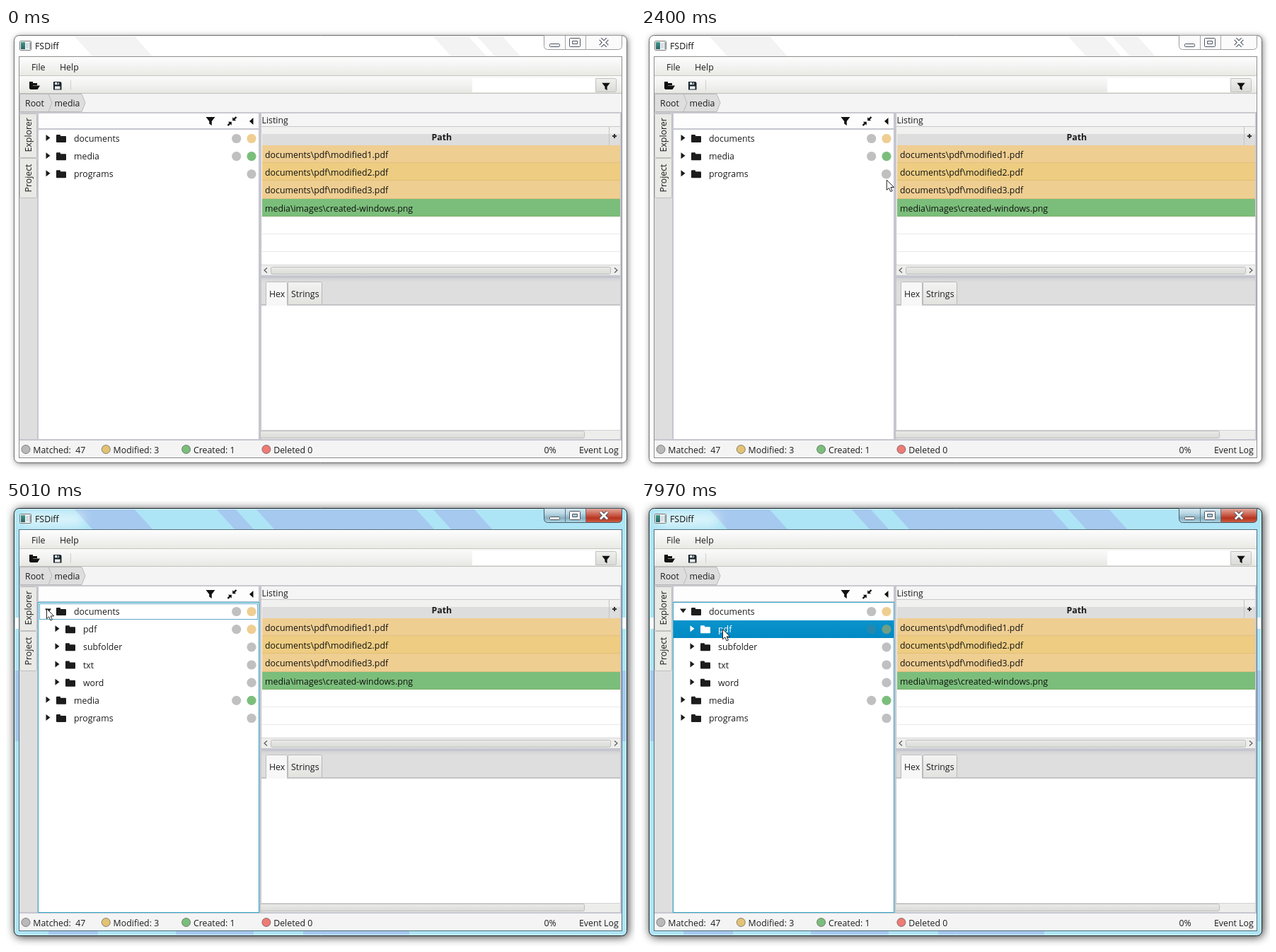
Write an HTML page with a canvas that moves like this. It is 889x630 px and loops after 8000 ms.

```html
<!DOCTYPE html>
<html lang="en">
<head>
<meta charset="utf-8">
<title>FSDiff</title>
<style>
html, body { margin: 0; width: 100%; height: 100%; overflow: hidden; background: #fff; }
canvas { display: block; width: 889px; height: 630px; }
</style>
</head>
<body>
<canvas id="stage" width="889" height="630"></canvas>
<script>
const c = document.getElementById('stage').getContext('2d');
const LOOP = 8000, OPEN_AT = 5010, SELECT_AT = 7960, HOVER_MS = 175, ROW = 25.17;
const GRAY = '#c0c0c0', AMBER = '#efce92', GREEN = '#7bbe7b', INK = '#1c1c1c', RULE = '#c5c6cf';

// pointer strokes: start, end, x, y, downward bow, ease-out power
const ENTRY = { x: 275, y: 624 };
const MOVES = [
  [830, 1560, 307, 338, 0, 2.6],
  [1820, 2520, 347, 214],
  [2720, 3140, 348, 186],
  [3340, 3760, 347, 163],
  [4090, 4750, 57, 152, 37, 3.7],
  [5340, 6120, 338, 186, 38],
  [6180, 6450, 357, 183],
  [6450, 6760, 345, 184],
  [7020, 7410, 135, 193],
  [7670, 7940, 115, 181]
];

const TOP = [
  { name: 'documents', depth: 0, col: AMBER, count: '3' },
  { name: 'media', depth: 0, col: GREEN, count: '1' },
  { name: 'programs', depth: 0, col: GRAY, count: '5' }
];
const INNER = ['pdf', 'subfolder', 'txt', 'word'].map((name, i) =>
  ({ name, depth: 1, col: i ? GRAY : AMBER, count: '3' }));

const clamp = v => Math.max(0, Math.min(1, v));
const rowsAt = t => t < OPEN_AT ? TOP : [TOP[0], ...INNER, TOP[1], TOP[2]];

function box(x, y, w, h, fill) { c.fillStyle = fill; c.fillRect(x, y, w, h); }

function frameBox(x, y, w, h, col) {
  c.lineWidth = 1;
  c.strokeStyle = col;
  c.strokeRect(x, y, w, h);
}

function fade(y0, y1, ...cols) {
  const g = c.createLinearGradient(0, y0, 0, y1);
  cols.forEach((col, i) => g.addColorStop(i / (cols.length - 1), col));
  return g;
}

function round(x, y, w, h, r, fill, stroke) {
  c.beginPath();
  c.roundRect(x, y, w, h, r);
  if (fill) { c.fillStyle = fill; c.fill(); }
  if (stroke) { c.strokeStyle = stroke; c.lineWidth = 1; c.stroke(); }
}

function poly(pts, fill, stroke, width = 1) {
  c.beginPath();
  for (let i = 0; i < pts.length; i += 2) c.lineTo(pts[i], pts[i + 1]);
  if (fill) { c.closePath(); c.fillStyle = fill; c.fill(); }
  if (stroke) { c.strokeStyle = stroke; c.lineWidth = width; c.stroke(); }
}

function text(s, x, y, fill = INK, weight = '') {
  c.font = `${weight} 12.35px "Open Sans", "Noto Sans", sans-serif`;
  c.fillStyle = fill;
  c.fillText(s, x, y);
}

function at(x, y, draw, turn = 0) {
  c.save();
  c.translate(x, y);
  c.rotate(turn);
  draw();
  c.restore();
}

function tip(t) {
  let p = ENTRY;
  for (const [t0, t1, x, y, bow = 0, power = 3] of MOVES) {
    if (t < t0) break;
    const s = 1 - (1 - clamp((t - t0) / (t1 - t0))) ** power;
    p = {
      x: p.x + (x - p.x) * s,
      y: p.y + (y - p.y) * s + bow * Math.sin(Math.PI * s)
    };
  }
  return p;
}

// share of the last moments the pointer spent on the badge in row i
function hover(t, name) {
  let hits = 0;
  const steps = 25;
  for (let k = 0; k < steps; k++) {
    const past = t - k * HOVER_MS / steps, p = tip(past);
    const i = rowsAt(past).findIndex(r => r.name === name);
    if (i >= 0 && p.x > 339.5 && p.x < 360 && Math.abs(p.y - 156.5 - i * ROW) < 8) hits++;
  }
  return hits / steps;
}

// leaning stripes across the glass of the title bar
function stripes(col, spans) {
  for (const [l, r] of spans) poly([l, 10, r, 10, r + 28, 41, l + 28, 41], col);
}

function chrome(active) {
  c.save();
  c.shadowColor = active ? 'rgba(0,0,0,.85)' : 'rgba(0,0,0,.5)';
  c.shadowBlur = active ? 13 : 8;
  c.shadowOffsetX = c.shadowOffsetY = 1.5;
  round(11.5, 10.5, 866, 605, 7, active ? '#aee5f6' : '#fff');
  c.restore();

  c.save();
  round(11.5, 10.5, 866, 605, 7);
  c.clip();
  if (active) {
    const blue = '#a6c9ef';
    stripes(blue, [[95, 180], [296, 323], [352, 578], [602, 660]]);
    for (const x of [12, 871]) {
      box(x, 165, 7, 16, '#fff');
      box(x, 240, 7, 100, blue);
    }
    for (let i = 0; i < 3; i++) box(60 + i * 180, 608, 70 + i * 40, 8, blue);
    c.filter = 'blur(8px)';
    round(22, 18, 88, 16, 8, 'rgba(255,255,255,.7)');
  } else stripes('#f3f3f3', [[95, 180], [602, 652], [664, 700]]);
  c.restore();
  round(12.5, 11.5, 864, 603, 6, null, active ? '#d9f5fc' : '#fafafa');
  round(11.5, 10.5, 866, 605, 7, null, active ? '#17242c' : '#707070');

  // caption buttons
  const low = [0, 0, 5, 5], sign = '#4c5560';
  round(760.5, 10.5, 110, 20, low, active ? fade(11, 31, '#d5eaf3', '#bad7e4', '#88afc0', '#b5dce9') : '#fbfbfb');
  if (active) round(819.5, 10.5, 51, 20, [0, 0, 5, 0], fade(11, 31, '#e3a79b', '#d06e5c', '#b8331f', '#d0684a'));
  round(760.5, 10.5, 110, 20, low, null, active ? '#445b66' : '#9b9b9b');
  for (const x of [790, 819]) box(x, 11, 1, 20, active ? '#5b7583' : '#a6a6a6');
  round(768.5, 22.5, 14, 4, 1, '#fff', sign);
  round(796.5, 14.5, 15, 12, 1, '#fff', sign);
  round(800.5, 18.5, 7, 4, 0, active ? '#a9c9d8' : '#fff', sign);
  for (const [col, w] of [[sign, 5], ['#fff', 2.8]])
    for (const s of [5, -5]) poly([845 - s, 15.5, 845 + s, 25.5], null, col, w);

  // window symbol and title
  round(19.5, 18.5, 16, 13, 1, '#f7f7f7', '#777');
  box(21, 20, 6, 10, fade(20, 30, '#3f9a8a', '#2c5f66'));
  box(28, 21, 4, 8, '#d5dbe0');
  box(33, 20, 2, 10, '#a8b4ba');
  text('FSDiff', 41, 30, '#111');

  box(18, 40, 853, 569, active ? '#55707c' : '#8d8d8d');
  box(19, 41, 851, 567, '#f4f4f4');
}

function funnel(x, y, s = 1) {
  at(x, y, () => {
    c.scale(s, s);
    poly([-6.5, -6, 6.5, -6, 1.8, 0, 1.8, 6, -1.8, 3.5, -1.8, 0], '#111');
  });
}

function crumb(x, end, s, sx) {
  poly([x, 93.5, end - 5, 93.5, end, 106, end - 5, 118.5, x, 118.5], '#dedede', '#b9b9b9');
  text(s, sx, 111);
}

function bars() {
  box(19, 41, 851, 27, fade(41, 68, '#fdfdfd', '#f3f3f2', '#e9e9e3'));
  box(19, 67, 851, 1, '#c6c6c2');
  text('File', 36, 60);
  text('Help', 76, 60);

  box(19, 68, 851, 25, fade(68, 93, '#fafafa', '#f2f2f1', '#e6e6e1'));
  box(19, 92, 851, 1, '#c0c0bd');
  box(33, 76, 5, 10, '#111');
  box(33, 78, 11, 3, '#111');
  poly([37, 81.5, 48, 81.5, 44.5, 87, 33.7, 87], '#111');
  round(67, 76, 11.5, 11.5, [0, 2.5, 0, 0], '#17242c');
  box(69, 77, 6, 3.2, '#f2f2f2');
  box(72.5, 77, 1.5, 2.6, '#17242c');
  box(69, 82.5, 7.5, 4, '#f2f2f2');
  box(91, 74, 1, 14, '#cfcfcb');
  box(659, 71, 175, 20, '#fff');
  round(833.5, 71.5, 29, 19, [0, 2, 2, 0], fade(71, 91, '#f1f1ef', '#d9d9d6'), '#c1c1bd');
  funnel(848, 83, .88);

  box(19, 93, 851, 27, '#f4f4f4');
  crumb(55, 112, 'media', 68.5);
  crumb(19.5, 65, 'Root', 27);
  box(19, 119, 851, 2, '#c9c9d0');
}

function sideTab(y, h, s, base) {
  round(19.5, y + .5, 24, h, 2, '#e9e9e6', '#bfbfbf');
  at(36, base, () => text(s, 0, 0), -Math.PI / 2);
}

function side() {
  box(19, 121, 26, 462, '#dedede');
  sideTab(121, 62, 'Explorer', 175.5);
  sideTab(184, 56, 'Project', 232.5);
  box(44, 120, 2, 464, RULE);
}

function thumb(x, y, w) {
  round(x, y, w, 10, 2, fade(y, y + 10, '#eaeae8', '#dadad7'), '#bdbdbd');
}

function listing() {
  box(357, 120, 4, 464, RULE);
  box(361, 121, 508, 19, '#f5f5f5');
  text('Listing', 361.5, 135);
  box(361, 139, 508, 1, '#c8c8c8');
  box(362, 140, 506, 10, '#f1f1f0');
  box(362, 150, 506, 16, '#dddddd');
  box(852, 140, 1, 26, '#c4c4c4');
  text('Path', 601.5, 158.5, INK, 'bold');
  box(857, 152, 6, 2, '#333');
  box(859, 150, 2, 6, '#333');
  box(362, 166, 506, 170, '#fff');
  const paths = [1, 2, 3].map(n => `documents\\pdf\\modified${n}.pdf`);
  paths.push('media\\images\\created-windows.png');
  for (let i = 0; i < 6; i++) {
    const y = Math.round(166 + i * ROW), end = Math.round(166 + (i + 1) * ROW);
    if (paths[i]) {
      box(362, y, 506, end - y, i === 3 ? GREEN : i === 1 ? '#eecd82' : AMBER);
      text(paths[i], 366, y + 18, '#111');
    }
    box(362, end - 1, 506, 1, paths[i] ? 'rgba(150,120,40,.16)' : '#e9e9e9');
  }
  box(361, 335, 508, 15, '#eeeeed');
  box(361, 335, 508, 1, '#d6d6d6');
  thumb(374.5, 338.5, 480);
  for (const [x, d] of [[367, 2], [862, -2]]) poly([x + d, 339.5, x - d, 343, x + d, 346.5], null, '#555', 1.1);

  // detail tabs
  box(357, 350, 512, 4, RULE);
  box(361, 354, 508, 38, fade(354, 360, '#d3d3d6', '#dedede'));
  round(367.5, 359.5, 30, 33, [2, 2, 0, 0], '#f7f7f7', '#bdbdbd');
  round(398.5, 359.5, 48, 32, [2, 2, 0, 0], fade(359, 391, '#f3f3f2', '#e2e2df'), '#b7b7b7');
  text('Hex', 372, 381);
  text('Strings', 403, 381);
  box(361, 391, 508, 2, '#c4c4c8');
  box(368, 391, 29, 2, '#f7f7f7');
  box(361, 393, 508, 176, '#fff');
  box(361, 569, 508, 13, '#ededec');
  box(361, 569, 508, 1, '#d3d3d3');
  thumb(359.5, 570.5, 458);
  box(868, 120, 2, 464, RULE);
}

function status() {
  box(19, 582, 851, 2, RULE);
  box(19, 584, 851, 24, '#f4f4f4');
  const labels = ['Matched:  47', 'Modified: 3', 'Created: 1', 'Deleted 0'];
  const cols = ['#b9b9b9', '#e3c273', GREEN, '#ef7a76'];
  labels.forEach((s, i) => {
    const x = 28 + i * 113.3;
    round(x - 6, 590.5, 12, 12, 6, cols[i], 'rgba(70,70,70,.6)');
    text(s, x + 10.3, 601.5);
  });
  text('0%', 760.5, 601.5);
  text('Event Log', 810, 601.5);
}

function folder(x, y, col) {
  round(x, y - 5.5, 6, 6, 1, col);
  round(x, y - 3.5, 14, 9, 1, col);
}

function badges(t, row, y, chosen) {
  const k = hover(t, row.name), grow = 8 * k;
  if (row.col !== GRAY) round(319.1 - grow, y - 6.6, 13.2, 13.2, 6.6, chosen ? '#2788ae' : GRAY);
  round(340.4 - grow * .88, y - 6.6, 13.2 + grow * .88, 13.2, 6.6, chosen ? '#6d9f86' : row.col);
  c.globalAlpha = clamp(k * 5 - 4);
  text(row.count, 341, y + 4.5);
  c.globalAlpha = 1;
}

function treeTools() {
  box(46, 121, 311, 22, '#fdfdfd');
  funnel(289, 132);
  for (const turn of [0, Math.PI]) at(319.5, 132, () => {
    poly([1.8, -1.8, 6, -6], null, '#111', 2.4);
    poly([.7, -.7, .7, -5.7, 5.7, -.7], '#111');
  }, turn);
  poly([344, 132, 349.5, 127, 349.5, 137], '#111');
}

function tree(t) {
  const open = t >= OPEN_AT, picked = t >= SELECT_AT;
  treeTools();
  box(45, 142, 313, 2, RULE);
  box(46, 144, 311, 438, '#fff');
  if (open) {
    frameBox(45.5, 143.5, 312, 439, '#31a9c9');
    if (picked) box(46, 169, 311, 25, fade(169, 194, '#0a93cb', '#0089c4'));
    else frameBox(47.5, 145.5, 308, 22, '#5fa9cb');
  }
  rowsAt(t).forEach((row, i) => {
    const y = 156.5 + i * ROW, x = row.depth * 13;
    const chosen = picked && row.name === 'pdf', ink = chosen ? '#fff' : INK;
    at(59.5 + x, y - 1, () => poly([-3, -4.5, 3, 0, -3, 4.5], ink), open && i === 0 ? Math.PI / 2 : 0);
    folder(71 + x, y, ink);
    text(row.name, 96 + x, Math.round(y + 4.5), ink);
    badges(t, row, y, chosen);
  });
}

function pointer(t) {
  if (t < MOVES[0][0]) return;
  const p = tip(t);
  at(p.x, p.y, () => {
    c.lineJoin = 'round';
    poly([.5, .5, .5, 14.8, 3.7, 11.8, 6, 17, 8.4, 16, 6.2, 10.9, 10.7, 10.9, .5, .5], '#fff', '#222');
  });
}

function draw(t) {
  box(0, 0, 889, 630, '#fff');
  chrome(t >= OPEN_AT);
  bars();
  side();
  listing();
  status();
  tree(t);
  pointer(t);
}

const start = performance.now();
function tick() {
  draw((performance.now() - start) % LOOP);
  requestAnimationFrame(tick);
}
tick();
</script>
</body>
</html>
```
